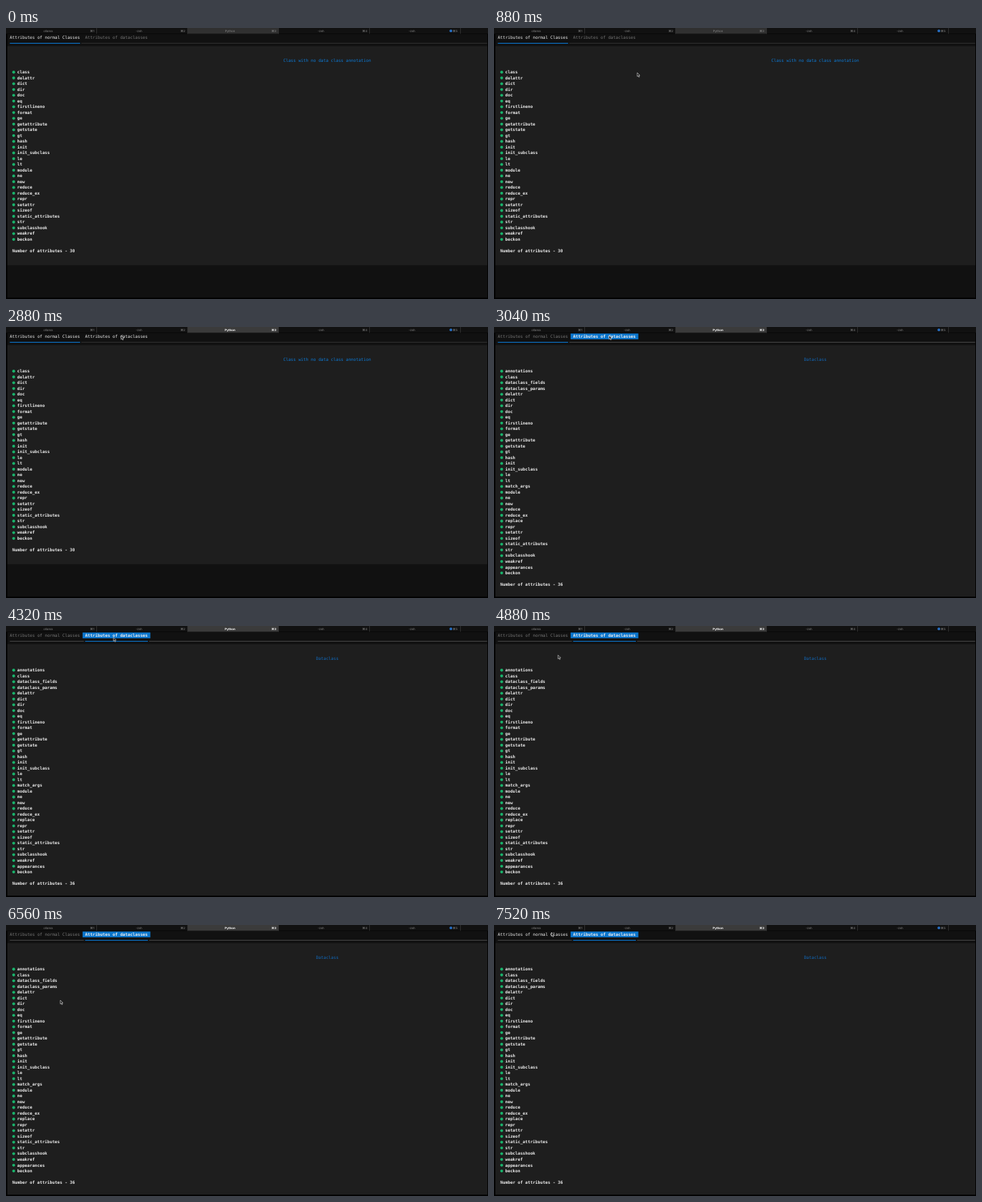
Write an HTML page with a canvas that moves like this. It is 710x400 px and loops after 8000 ms.

```html
<!DOCTYPE html>
<html lang="en">
<head>
<meta charset="utf-8">
<title>Class attributes</title>
<style>
html, body { margin: 0; width: 100%; height: 100%; overflow: hidden; background: #000; }
canvas { display: block; }
</style>
</head>
<body>
<canvas id="stage" width="710" height="400"></canvas>
<script>
const ctx = document.getElementById('stage').getContext('2d');
const LOOP = 8000;
const FOCUS = 2880;
const SWITCH = 3040;
const COLUMN = 3.7;
const ROW = 8.51;

const common = 'class delattr dict dir doc eq firstlineno format ge getattribute getstate gt hash init init_subclass le lt module ne new reduce reduce_ex repr setattr sizeof static_attributes str subclasshook weakref';
const normalNames = (common + ' beckon').split(' ');
const dataNames = ('annotations ' + common + ' appearances beckon')
  .replace('class ', 'class dataclass_fields dataclass_params ')
  .replace('lt module', 'lt match_args module')
  .replace('reduce_ex', 'reduce_ex replace')
  .split(' ');

const tabs = [
  { label: 'Attributes of normal Classes', x: 5.6, end: 109.2 },
  { label: 'Attributes of dataclasses', x: 116.5, end: 209 }
];
const windowTabs = ['ollama', '-zsh', 'Python', '-zsh', '-zsh'];

// Pointer positions: [time, x, y]
const pointerPath = [
  [480, 260, 130], [1200, 172, 15], [1520, 170, 14], [3040, 169.5, 12.5],
  [3600, 167.5, 13], [4240, 167.5, 13], [5120, 67, 54], [5280, 67, 54],
  [5520, 69, 112], [5840, 69, 227], [6160, 69, 227], [6320, 79, 262],
  [6560, 80, 111], [6720, 80, 111], [7040, 85, 10], [7360, 85, 10], [7520, 84.5, 11]
];

const mix = (a, b, p) => a + (b - a) * p;
const rowY = row => 14 + row * ROW;

function ease(p) {
  p = Math.min(1, Math.max(0, p));
  return p < 0.5 ? 4 * p ** 3 : 1 - (2 - 2 * p) ** 3 / 2;
}

function rect(x, y, w, h, color) {
  ctx.fillStyle = color;
  ctx.fillRect(x, y, w, h);
}

function text(value, x, y, color, weight = 'normal') {
  ctx.font = `${weight} 6.146px "DejaVu Sans Mono", monospace`;
  ctx.textAlign = 'left';
  ctx.fillStyle = color;
  ctx.fillText(value, x, y + 2.1);
}

function drawTitleBar(focused) {
  rect(0, 0, 710, 8.5, '#111');
  rect(267, 0, 135, 8.5, focused ? '#3b3b3b' : '#303030');
  windowTabs.forEach((label, i) => {
    const left = i * 134;
    const active = focused && i === 2;
    const color = active ? '#fff' : '#8c8c8c';
    ctx.font = `${active ? 'bold ' : ''}4.4px Inter, sans-serif`;
    ctx.fillStyle = color;
    ctx.textAlign = 'center';
    ctx.fillText(label, left + 62, 6);
    ctx.textAlign = 'right';
    ctx.fillText('⌘' + (i + 1), i === 4 ? 665 : left + 130, 6);
    rect(left + 133, 0, 1, 8.5, '#303030');
  });
  dot(655.3, 4.2, 2, '#276fc4');
}

function dot(x, y, radius, color) {
  ctx.fillStyle = color;
  ctx.beginPath();
  ctx.arc(x, y, radius, 0, 2 * Math.PI);
  ctx.fill();
}

function drawTabs(time, selected) {
  const hovered = time >= 6960 ? 0 : time >= 1200 ? 1 : -1;
  if (selected) rect(112.8, 9.6, 99.8, 8.6, '#0b75cc');
  tabs.forEach(({ label, x }, i) => {
    const bright = i === selected || i === hovered;
    text(label, x, rowY(0), bright ? '#f0f0f0' : '#777', i === selected && selected ? 'bold' : 'normal');
  });

  const p = ease((time - SWITCH) / 320);
  const start = mix(tabs[0].x, tabs[1].x, p);
  const end = mix(tabs[0].end, tabs[1].end, p);
  const lineColor = time < SWITCH ? '#303030' : '#484848';
  rect(5.6, 22, Math.max(0, start - 7.4), 1, lineColor);
  rect(end + 1.8, 22, 707 - end, 1, lineColor);
  rect(start, 22, end - start, 1.1, '#0b78d2');
}

function drawPage(names, title, color) {
  const countRow = names.length + 7;
  rect(2, 26.8, 707, Math.min(398, rowY(countRow + 2.5)) - 26.8, '#1e1e1e');
  text(title, 473.3 - title.length * COLUMN / 2, rowY(4), color);
  names.forEach((name, i) => {
    dot(11.3, rowY(i + 6) + 0.2, 2.15, '#19b36b');
    text(name, 16.5, rowY(i + 6), '#ededed', 'bold');
  });
  text('Number of attributes - ' + names.length, 9.2, rowY(countRow), '#ededed', 'bold');
}

function drawPointer(time) {
  if (time < pointerPath[0][0]) return;
  const next = pointerPath.findIndex(point => point[0] > time);
  const to = pointerPath.at(next);
  const from = next < 0 ? to : pointerPath[next - 1];
  const p = to === from ? 1 : (time - from[0]) / (to[0] - from[0]);
  ctx.save();
  ctx.translate(mix(from[1], to[1], p), mix(from[2], to[2], p));
  ctx.fillStyle = '#111';
  ctx.strokeStyle = '#ddd';
  ctx.lineWidth = 0.65;
  const arrow = new Path2D('M0 0V5.6L1.3 4.4L2.3 6.6L3.2 6.2L2.2 4.1H4Z');
  ctx.fill(arrow);
  ctx.stroke(arrow);
  ctx.restore();
}

function draw(now) {
  const time = now % LOOP;
  const selected = time < SWITCH ? 0 : 1;
  ctx.textRendering = 'geometricPrecision';
  rect(0, 0, 710, 400, '#000');
  rect(2, 9, 707, 389, '#111');
  drawTitleBar(time >= FOCUS);
  drawTabs(time, selected);
  if (selected) drawPage(dataNames, 'Dataclass', '#116bc0');
  else drawPage(normalNames, 'Class with no data class annotation', '#0c7cda');
  drawPointer(time);
  requestAnimationFrame(() => draw(performance.now()));
}

draw(0);
</script>
</body>
</html>
```
